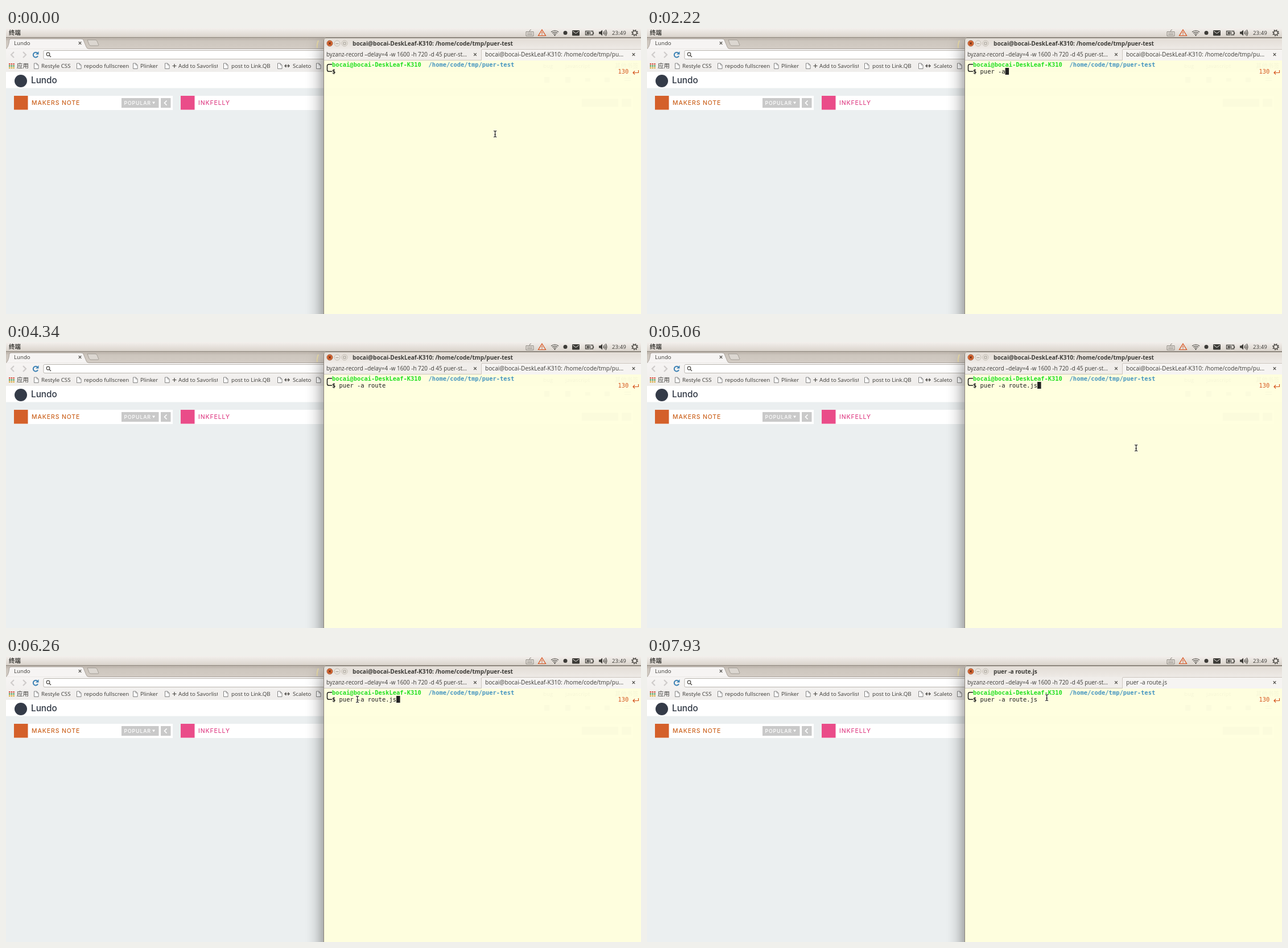
An HTML page that plays this animation: 1116 px wide and 502 px high, repeating every 7.99 s.

```html
<!DOCTYPE html>
<html lang="en">
<head>
<meta charset="utf-8">
<style>
html, body { margin: 0; width: 100%; height: 100%; overflow: hidden; }
svg { display: block; width: 1116px; height: 502px; }
text { font: 9.7px "Open Sans", "Noto Sans", sans-serif; fill: #3c3b37; white-space: pre; }
.cjk { font-family: "Noto Sans CJK SC", "Noto Sans CJK", sans-serif; font-size: 10.4px; }
.bold { font-weight: bold; }
.page { font-family: Inter, sans-serif; font-weight: 500; font-size: 10.5px; letter-spacing: .85px; }
.mono { font: 10.43px "DejaVu Sans Mono", monospace; fill: #1c1c1c; }
.mono.bold { font-weight: bold; }
.line { fill: none; stroke: #4a4843; stroke-width: 1.2; }
</style>
</head>
<body>
<svg viewBox="0 0 1116 502">
<defs>
  <linearGradient id="panel" x2="0" y2="1"><stop stop-color="#f3f0ed"/><stop offset="1" stop-color="#d9d2ca"/></linearGradient>
  <linearGradient id="titlebar" x2="0" y2="1"><stop stop-color="#e2dcd5"/><stop offset="1" stop-color="#eeeae6"/></linearGradient>
  <linearGradient id="strip" x2="0" y2="1"><stop stop-color="#b8b0a7"/><stop offset=".3" stop-color="#cdc6be"/><stop offset="1" stop-color="#d3ccc5"/></linearGradient>
  <linearGradient id="toolbar" x2="0" y2="1"><stop stop-color="#f6f4f3"/><stop offset="1" stop-color="#efedeb"/></linearGradient>
  <filter id="blur" filterUnits="userSpaceOnUse" x="480" y="-40" width="760" height="720"><feGaussianBlur stdDeviation="15"/></filter>
  <g id="sheet"><path d="M.5.5H5L8 3.500V10H.5Z" fill="#fff" stroke="#777" stroke-width=".9"/><path d="M5 .5V3.500H8" fill="none" stroke="#777" stroke-width=".8"/></g>
  <path id="cross" d="M-2.300-2.300 2.300 2.300M2.300-2.300-2.300 2.300" class="line"/>
  <path id="beam" d="M-2.500-5.300Q0-5.300 0-3.800Q0-5.300 2.500-5.300M0-4V4M-2.500 5.300Q0 5.300 0 3.800Q0 5.300 2.500 5.300M-1.500 1H1.500" fill="none"/>
  <clipPath id="fade"><rect x="290" y="58" width="82" height="18"/></clipPath>
</defs>

<!-- browser -->
<rect y="17" width="560" height="20" fill="url(#strip)"/>
<path d="M143 21H157Q159 21 160 23L163 30Q163 31 161 31H149Q147 31 146 29Z" fill="#dcd7d1" stroke="#99938b" stroke-width=".8"/>
<path d="M549 22Q546 29 547 35" fill="none" stroke="#eadca8" stroke-width="2"/>
<path d="M0 36.500H560V77H0Z" fill="url(#toolbar)"/>
<path d="M0 36.500Q3 35 5 27L6 21Q7 19 9 19H132Q135 19 136 21L141 33Q142 36.500 146 36.500" fill="#f6f4f3" stroke="#9c958d" stroke-width=".8"/>
<path d="M146 36.500H560" stroke="#9c958d" stroke-width=".8"/>
<text x="14" y="30">Lundo</text>
<use href="#cross" x="130" y="26.500"/>
<path d="M14 42 9 47 14 52M30 42 35 47 30 52" fill="none" stroke="#cfcccb" stroke-width="2.200"/>
<path d="M55.500 44.500A4.300 4.300 0 1 0 56 49" fill="none" stroke="#3f83b5" stroke-width="2"/>
<path d="M57.500 41V46.500H52Z" fill="#3f83b5"/>
<rect x="66" y="39.500" width="500" height="15" rx="2" fill="#fff" stroke="#b3aea8" stroke-width=".9"/>
<circle cx="74" cy="46" r="2.800" class="line"/><path d="M76 48 79 51" class="line"/>
<g id="apps"></g>
<text x="19" y="70" class="cjk">应用</text>
<g id="bookmarks"></g>
<g clip-path="url(#fade)"><path d="M292.500 66.500H299.500M296 63V70" class="line"/><text x="303" y="70">Add to Savorlist</text></g>
<path d="M490 66.500H498M492.500 64 490 66.500 492.500 69M495.500 64 498 66.500 495.500 69" class="line"/>

<rect y="77" width="560" height="29" fill="#fff"/>
<rect y="105.500" width="560" height="397" fill="#ebeff0"/>
<circle cx="26" cy="93" r="11" fill="#343b48"/>
<text x="44" y="97" class="page" style="font-size:15.300px;letter-spacing:0;fill:#2d3542">Lundo</text>
<path d="M14 119H293V144H14ZM307 119H560V144H307Z" fill="#fff"/>
<rect x="14" y="119" width="24.500" height="24.500" fill="#d4602a"/>
<rect x="307" y="119" width="24.500" height="24.500" fill="#ea4c89"/>
<text x="45" y="135.300" class="page" style="fill:#cc6420">MAKERS NOTE</text>
<text x="338" y="135.300" class="page" style="fill:#e0478a">INKFELLY</text>
<path d="M203 123H268.500V140H203ZM272 123H289.500V140H272Z" fill="#c9c9c9"/>
<text x="207.500" y="134.700" class="page" style="font-size:8.800px;fill:#fff">POPULAR</text>
<path d="M257 129.500H262L259.500 133.500Z" fill="#fff"/>
<path d="M282.500 127.500 278.500 131.500 282.500 135.500" fill="none" stroke="#fff" stroke-width="1.700"/>
<rect x="558" y="30" width="600" height="600" opacity=".55" filter="url(#blur)"/>

<!-- top panel -->
<rect width="1116" height="17" fill="url(#panel)"/>
<path d="M0 16.500H1116" stroke="#8f8880"/>
<text x="5" y="12.300" class="cjk bold">终端</text>
<g class="line">
  <path d="M914 6.500H927V14H914ZM916 9H925M916 11.500H925M920 6Q920 3 923 3" stroke="#8d8982" stroke-width="1"/>
  <path d="M942 3 948.500 13.500H935.500ZM942 6.500V10M942 11V12.200" stroke="#d9531e"/>
  <path d="M958 7Q964.500 2 971 7M960 9Q964.500 5.500 969 9M962 11Q964.500 9 967 11" stroke-width="1.100"/>
  <path d="M1018.500 5.500H1031.500V12H1018.500ZM1032.500 7.500V10.500" stroke-width="1.300"/>
  <path d="M1050 6Q1051.500 8.500 1050 11M1052 4.500Q1054.500 8.500 1052 12.500M1054 3Q1057.500 8.500 1054 14"/>
  <circle cx="1105" cy="8.500" r="3.600" stroke-width="1.500"/>
  <circle cx="1105" cy="8.500" r="5" stroke-width="1.800" stroke-dasharray="1.800 2.130"/>
</g>
<g fill="#3c3b37">
  <circle cx="964.500" cy="12.800" r="1.100"/><circle cx="983" cy="8.500" r="3.500"/>
  <rect x="995" y="4" width="13" height="9.500" rx="1"/>
  <rect x="1020.500" y="7.300" width="6" height="3"/>
  <path d="M1042 6.500H1044.500L1048 3.500V13.500L1044.500 10.500H1042Z"/>
</g>
<path d="M996 5.500 1001.500 9.500 1007 5.500" fill="none" stroke="#ece8e3"/>
<path d="M1027 4.500 1024.500 9H1026.500L1025 13 1029 8H1026.500Z" fill="#3c3b37" stroke="#ece8e3" stroke-width=".5"/>
<text x="1065" y="12">23:49</text>

<!-- terminal -->
<path d="M558 502V22Q558 17 563 17H1111Q1116 17 1116 22V502Z" fill="#fefede"/>
<path d="M558 37V22Q558 17 563 17H1111Q1116 17 1116 22V37Z" fill="url(#titlebar)"/>
<rect x="558" y="37" width="558" height="20" fill="#f0edea"/>
<path d="M835 57V39Q835 37.500 837 37.500H1116V57Z" fill="#f6f4f2"/>
<path d="M558 56.500H835.500V39Q835.500 37.500 837 37.500H1116" fill="none" stroke="#c9c2ba" stroke-width=".9"/>
<path d="M558.500 502V22Q558.500 17.500 563 17.500H1116" fill="none" stroke="#8c857b"/>
<circle cx="569" cy="27" r="5" fill="#df6b35" stroke="#8c4a2d" stroke-width=".8"/>
<path d="M567 25 571 29M571 25 567 29" stroke="#6b2e14" stroke-width="1.300"/>
<g fill="#e9e5df" stroke="#b9b1a6" stroke-width=".8"><circle cx="582" cy="27" r="5"/><circle cx="595" cy="27" r="5"/><path d="M579.500 27.500H584.500M593 25H597V29H593Z" stroke="#8f877c"/></g>
<text id="title" x="609" y="30.600" class="bold" style="font-size:10.100px"></text>
<text x="563" y="50" style="font-size:9.900px">byzanz-record –delay=4 -w 1600 -h 720 -d 45 puer-st…</text>
<text id="tab" x="842" y="50" style="font-size:10.150px"></text>
<use href="#cross" x="824.500" y="46.500"/><use href="#cross" x="1103" y="46.500"/>

<!-- page showing faintly through the terminal -->
<path d="M559 77H1116V105.500H559ZM559 119H1102V144H559Z" fill="#ffffdf"/>
<g opacity=".04"><text x="944" y="70">bug</text><text x="983" y="70">javascript</text><text x="1070" y="70" class="cjk">其他书签</text></g>
<path d="M946 86H955V96H946ZM983 86H992V96H983ZM1018 88H1027V94H1018ZM1052 87H1061V95H1052ZM1087 87H1098V89H1087ZM1087 91H1098V93H1087ZM1012 124H1076V138H1012ZM1082 124H1099V138H1082Z" opacity=".016"/>

<path d="M573 63.700H567.500Q564.500 63.700 564.500 66.500V73.500Q564.500 76.300 567.500 76.300H573" fill="none" stroke="#1c1c1c" stroke-width="1.500"/>
<text x="573" y="67.500" class="mono bold" style="fill:#20e020">bocai@bocai-DeskLeaf-K310</text>
<text x="742.600" y="67.500" class="mono bold" style="fill:#4595c0">/home/code/tmp/puer-test</text>
<text x="573" y="80.200" class="mono bold">$</text>
<text id="command" x="585.600" y="80.200" class="mono"></text>
<text x="1075.500" y="80.200" class="mono" style="fill:#d5561f">130</text>
<path d="M1111.500 74V78.500H1102M1105 75.500 1102 78.500 1105 81.500" fill="none" stroke="#d5561f" stroke-width="1.200"/>
<rect id="cursor" y="70" width="6.500" height="12" fill="#222"/>
<g id="pointer">
  <use href="#beam" stroke="#fff" stroke-width="2.600" opacity=".75"/>
  <use href="#beam" stroke="#222" stroke-width="1.200"/>
</g>
</svg>
<script>
const byId = id => document.getElementById(id);
const LOOP = 7990, CELL = 6.28, COMMAND_X = 585.6;
const COMMAND = 'puer -a route.js';
const PROMPT = 'bocai@bocai-DeskLeaf-K310: /home/code/tmp/pu';
const keyTimes = [840, 1130, 1290, 1400, 1540, 1970, 2220, 2690, 2980, 3270, 3390, 3680, 3810, 4530, 4720, 4850];
const cursorOn = [[530, 4340], [4530, 5390], [5890, 6490], [7090, 7670]];
const pointerOn = [[0, 890], [5060, 7150], [7300, 7820], [7930, LOOP]];
// time, x, y
const pointerPath = [
  [5295, 859, 186], [5390, 800, 152], [5480, 705, 96], [5600, 645, 71], [5780, 633, 59],
  [6110, 617, 72], [6260, 617, 77], [6490, 614, 76], [7150, 614, 76],
  [7300, 656, 71], [7390, 681, 73], [7570, 702, 73]
];

const colors = ['#d9503f', '#4c9a50', '#d9a93a'];
for (let i = 0; i < 9; i++) {
  const row = Math.floor(i / 3);
  byId('apps').innerHTML += `<rect x="${5 + i % 3 * 3.7}" y="${62 + row * 3.4}" width="2.4" height="2.4" fill="${colors[row]}"/>`;
}
const bookmarks = [[49, 62, 'Restyle CSS'], [124, 137, 'repodo fullscreen'], [223, 236, 'Plinker'], [279, 0, ''],
  [382, 396, 'post to Link.QB'], [477, 504, 'Scaleto'], [545, 0, '']];
byId('bookmarks').innerHTML = bookmarks.map(([icon, x, label]) =>
  `<use href="#sheet" x="${icon}" y="61.5"/><text x="${x}" y="70">${label}</text>`).join('');

const within = (t, spans) => spans.some(([from, to]) => t >= from && t < to);
const show = (id, on) => byId(id).setAttribute('visibility', on ? 'visible' : 'hidden');

function pointerAt(t) {
  // the pointer moves in steps of about 45 ms
  const origin = t < 7300 ? 5340 : 7300;
  const time = origin + Math.floor((t - origin) / 45) * 45;
  const next = pointerPath.findIndex(p => p[0] > time);
  if (next === 0) return pointerPath[0].slice(1);
  if (next < 0) return pointerPath.at(-1).slice(1);
  const a = pointerPath[next - 1], b = pointerPath[next];
  const k = (time - a[0]) / (b[0] - a[0]);
  return [1, 2].map(i => Math.round(a[i] + (b[i] - a[i]) * k));
}

function draw(t) {
  const typed = keyTimes.filter(time => time <= t).length;
  const running = t >= 7860;
  const [x, y] = pointerAt(t);
  byId('command').textContent = COMMAND.slice(0, typed);
  byId('title').textContent = running ? COMMAND : PROMPT + 'er-test';
  byId('tab').textContent = running ? COMMAND : PROMPT + '…';
  byId('cursor').setAttribute('x', COMMAND_X + typed * CELL);
  byId('pointer').setAttribute('transform', `translate(${x + .6} ${y})`);
  show('cursor', within(t, cursorOn));
  show('pointer', within(t, pointerOn));
}

const start = performance.now();
function tick() {
  draw((performance.now() - start) % LOOP);
  requestAnimationFrame(tick);
}
tick();
</script>
</body>
</html>
```
